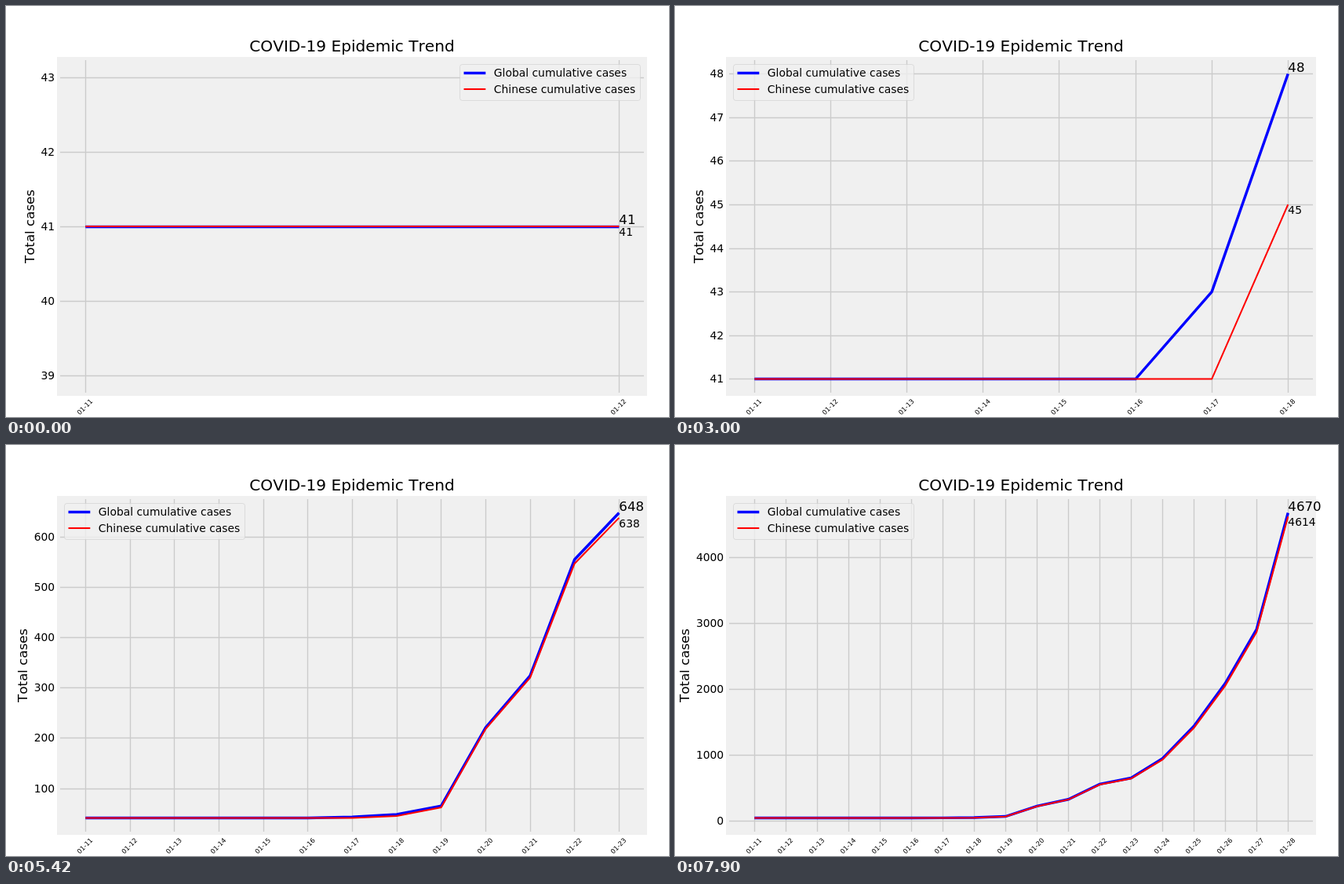
An HTML page with a canvas that plays this animation: 845 px wide and 524 px high, repeating every 8000 ms.

```html
<!DOCTYPE html>
<html lang="en">
<head>
<meta charset="utf-8">
<title>COVID-19 Epidemic Trend</title>
<style>
  html, body { margin: 0; width: 100%; height: 100%; overflow: hidden; background: #fff; }
  canvas { display: block; }
</style>
</head>
<body>
<canvas id="chart" width="845" height="524"></canvas>
<script>
const ctx = document.getElementById('chart').getContext('2d');
const world = [41, 41, 41, 41, 41, 41, 43, 48, 65, 221, 324, 555, 648, 942, 1434, 2084, 2905, 4670];
const china = [41, 41, 41, 41, 41, 41, 41, 45, 62, 218, 320, 547, 638, 926, 1406, 2048, 2862, 4614];
// Each moment adds one more day to the chart, which begins with two.
const changes = [430, 910, 1460, 1920, 2450, 3000, 3460, 3930, 4410, 4960, 5420, 5970, 6430, 6980, 7440, 7900];
const LOOP = 8000, TOP = 67, HEIGHT = 428, LEFT = 101, WIDTH = 680;
const BLUE = '#00f', RED = '#f00', PANEL = '#f0f0f0';

function text(str, x, y, size, align = 'left', angle = 0) {
  ctx.save();
  ctx.translate(x, y);
  ctx.rotate(angle);
  ctx.font = `${size}px "DejaVu Sans", sans-serif`;
  ctx.fontKerning = 'none';
  ctx.textAlign = align;
  ctx.fillStyle = '#000';
  ctx.fillText(str, 0, angle === -Math.PI / 4 ? 3 : 0);
  ctx.restore();
}

function line(points, color, width) {
  ctx.beginPath();
  points.forEach(([x, y]) => ctx.lineTo(x, y));
  ctx.strokeStyle = color;
  ctx.lineWidth = width;
  ctx.stroke();
}

function tickStep(range) {
  const raw = range / 9;
  const scale = 10 ** Math.floor(Math.log10(raw));
  return scale * [1, 2, 2.5, 5, 10].find(s => s * scale >= raw);
}

function legend(x) {
  ctx.beginPath();
  ctx.roundRect(x + 0.5, 74.5, 230, 46, 3);
  ctx.fillStyle = 'rgba(240,240,240,.8)';
  ctx.fill();
  ctx.strokeStyle = 'rgba(204,204,204,.8)';
  ctx.lineWidth = 0.7;
  ctx.stroke();
  line([[x + 5.5, 85.5], [x + 33.3, 85.5]], BLUE, 3.47);
  line([[x + 5.5, 106], [x + 33.3, 106]], RED, 2.08);
  text('Global cumulative cases', x + 43.8, 90, 13.89);
  text('Chinese cumulative cases', x + 43.8, 111, 13.89);
}

function draw(days) {
  const last = days - 1, flat = world[last] === 41;
  let low = 41, high = world[last];
  if (flat) { low *= 0.95; high *= 1.05; }
  const range = (high - low) * 1.1;
  const bottom = low - range / 22;
  const px = i => LEFT + WIDTH * i / last;
  const py = v => TOP + HEIGHT * (1 - (v - bottom) / range);

  ctx.fillStyle = '#fff';
  ctx.fillRect(0, 0, 845, 524);
  ctx.fillStyle = PANEL;
  ctx.fillRect(65, 65, 752, 432);

  for (let i = 0; i < days; i++) {
    const x = Math.floor(px(i) + 0.4) + 0.5;
    line([[x, 69], [x, 493]], '#cbcbcb', 1.39);
    text(`01-${11 + i}`, px(i) - 0.6, 511, 8.33, 'center', -Math.PI / 4);
  }

  const step = tickStep(range);
  let label = '';
  for (let k = Math.ceil(bottom / step); k * step <= bottom + range; k++) {
    const y = Math.floor(py(k * step) + 0.3) + 0.5;
    line([[69, y], [813, y]], '#cbcbcb', 1.39);
    label = (k * step).toFixed(step < 1 ? 2 : 0);
    text(label, 62.2, y + 4.6, 13.89, 'right');
  }
  const labelWidth = 13.89 * (0.636 * label.replace('.', '').length + (label.includes('.') ? 0.318 : 0));
  text('Total cases', 53.2 - labelWidth, 281, 16.67, 'center', -Math.PI / 2);
  text('COVID-19 Epidemic Trend', 441, 58, 20.1, 'center');

  const path = (data, shift) => data.slice(0, days).map((v, i) => [px(i) + 0.3, py(v) + (flat ? shift : 0)]);
  line(path(world, 0.5), BLUE, 3.47);
  line(path(china, 0), RED, 2.08);
  text(world[last], 781.3, py(world[last]) - 2.8, 16.67);
  text(china[last], 781.3, py(china[last]) + 12, 13.89);
  legend(flat ? 578 : 74);
}

function tick() {
  const t = performance.now() % LOOP;
  draw(2 + changes.filter(c => t >= c).length);
  requestAnimationFrame(tick);
}
tick();
</script>
</body>
</html>
```
